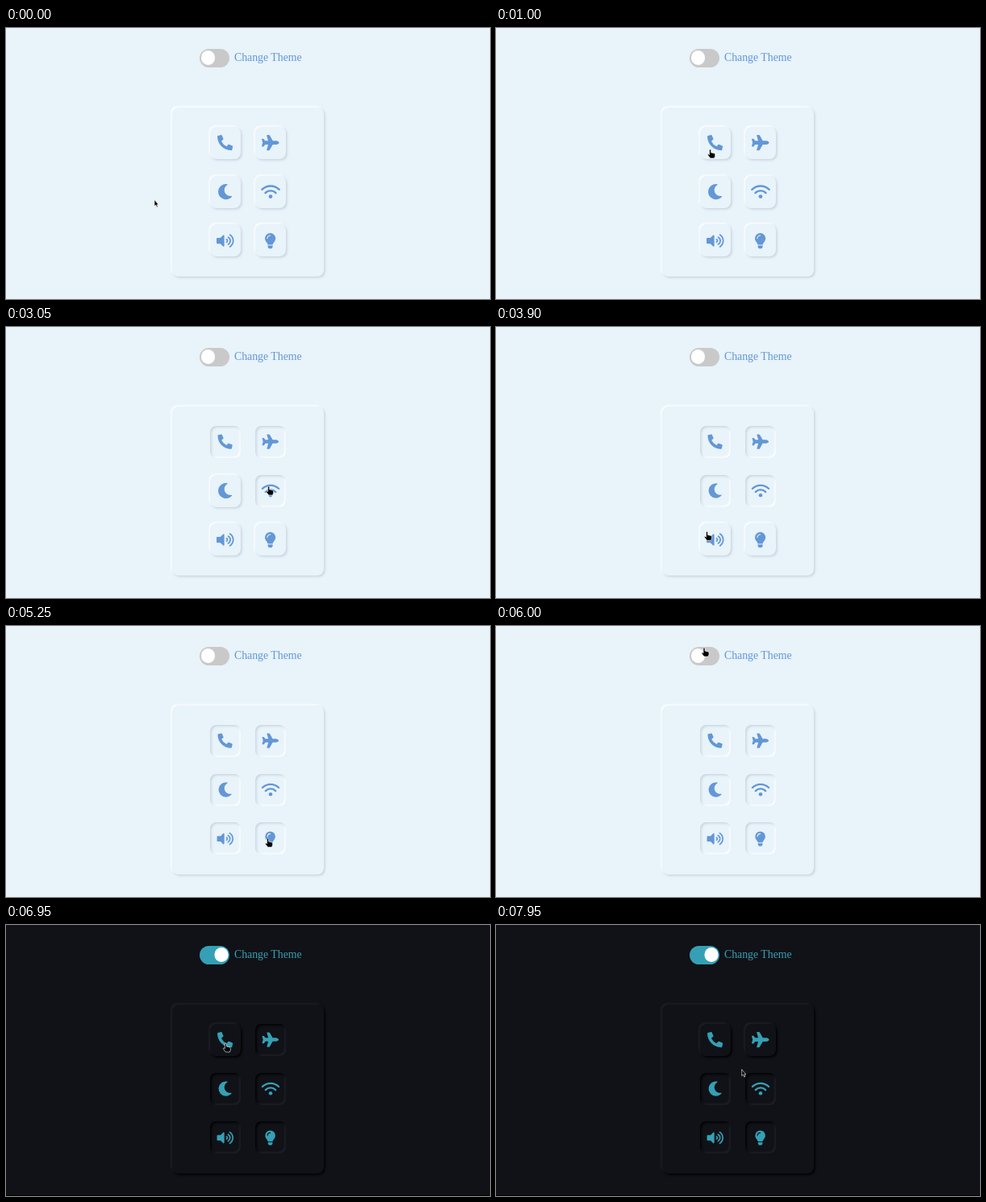
An HTML page that plays this animation: 600 px wide and 337 px high, repeating every 8 s.

```html
<!DOCTYPE html>
<html lang="en">
<head>
<meta charset="utf-8">
<title>Theme panel</title>
<style>
  html, body { margin: 0; width: 100%; height: 100%; overflow: hidden; }
  body {
    --bg: #e8f3fa; --ink: #6397d6; --shade: #c8d4dd; --glow: #fff;
    position: relative; background: var(--bg); color: var(--ink);
  }
  body.dark { --bg: #101217; --ink: #35a0b5; --shade: #000; --glow: #202329; }
  body.dark::after {
    content: ""; position: absolute; left: 0; right: 0; top: 336px; height: 1px; background: #000;
  }
  body > *, .key, #knob { position: absolute; box-sizing: border-box; }
  #label {
    left: 283px; top: 28px; font: 13.8px/18px "Liberation Serif", "Times New Roman", serif; white-space: nowrap;
  }
  #toggle { left: 239.5px; top: 25.5px; width: 37.5px; height: 23px; border-radius: 12px; }
  #knob { left: 2px; top: 2.9px; width: 17.2px; height: 17.2px; border-radius: 50%; background: #fff; }
  .raised { box-shadow: 1.5px 1.5px 3px var(--shade), -1.5px -1.5px 2.5px var(--glow); }
  .pressed { box-shadow: inset 1.5px 1.5px 3px var(--shade), inset -1.5px -1.5px 2.5px var(--glow); }
  #panel { left: 206px; top: 98.5px; width: 188px; height: 210px; border-radius: 8px; }
  .key { width: 38px; height: 40px; border-radius: 8px; display: grid; place-items: center; }
  .key svg { height: 19.2px; fill: var(--ink); overflow: visible; }
  .pressed svg { transform: scale(.95); }
  .line { fill: none; stroke: var(--ink); stroke-linecap: round; }
  #cursor { left: 0; top: 0; width: 20px; height: 20px; overflow: visible; stroke: #fff; stroke-width: .6; }
</style>
</head>
<body>
<div id="toggle"><div id="knob"></div></div>
<div id="label">Change Theme</div>
<div id="panel" class="raised"></div>
<svg id="cursor"><path id="pointer"/></svg>
<script>
const LOOP = 8000, SWITCH_AT = 6150;
const $ = id => document.getElementById(id);

// Each key: icon width on a 512-high grid, icon markup, times at which it flips.
const keys = [
  { w: 512, flips: [1300, 6900], icon: `<path d="M497 362l-112-48a24 24 0 0 0-28 7l-49 60A371 371 0 0 1 131 204l60-49a24 24 0 0 0 7-28l-48-112A24 24 0 0 0 123 1L19 25A24 24 0 0 0 0 48c0 256 208 464 464 464a24 24 0 0 0 23-19l24-104a24 24 0 0 0-14-27z"/>` },
  { w: 576, flips: [2250, 7700], icon: `<path d="M482 192c34 0 94 29 94 64s-60 64-94 64H366L265 496q-9 16-28 16h-56q-20 0-15-20l49-172H112l-43 58q-5 6-13 6H14q-16 0-13-18L32 256 1 146q-4-18 13-18h42q8 0 13 6l43 58h103L166 20q-5-20 15-20h56q19 0 28 16l101 176z"/>` },
  { w: 512, flips: [3750], icon: `<path d="M283 512c79 0 151-36 199-95 7-9-1-21-12-19-124 24-238-72-238-197 0-72 39-139 102-175 9-5 7-20-4-22A256 256 0 1 0 283 512z"/>` },
  { w: 640, flips: [3000], icon: `<path class="line" stroke-width="64" d="M36 184A401 401 0 0 1 604 184M146 298A242 242 0 0 1 494 298"/><circle cx="320" cy="416" r="64"/>` },
  { w: 576, flips: [4400], icon: `<path d="M215 71l-89 89H24q-24 0-24 24v144q0 24 24 24h102l89 89c15 15 41 4 41-17V88c0-21-26-32-41-17z"/><path class="line" stroke-width="48" d="M446 59A238 238 0 0 1 446 453M388 140A133 133 0 0 1 388 372M332 212A48 48 0 0 1 332 300"/>` },
  { w: 352, flips: [5250], icon: `<path d="M96 416h160v38q0 10-5 18l-17 26q-10 14-27 14h-62q-17 0-27-14l-17-26q-5-8-5-18zM0 176c0 44 16 85 44 116 16 19 42 58 52 92h160c10-34 36-73 52-92 28-31 44-72 44-116a176 176 0 0 0-352 0z"/><path class="line" style="stroke:var(--bg)" stroke-width="32" d="M80 176a96 96 0 0 1 96-96"/>` }
];

keys.forEach((key, i) => {
  key.x = 253 + i % 2 * 56;
  key.y = 123 + (i >> 1) * 60.7;
  key.el = document.createElement("div");
  key.el.style.cssText = `left:${key.x}px;top:${key.y}px`;
  key.el.innerHTML = `<svg viewBox="0 0 ${key.w} 512">${key.icon}</svg>`;
  document.body.insertBefore(key.el, $("cursor"));
});

// Cursor stops: time, x, y of the hot spot.
const stops = [
  [500, 184, 213.5], [1100, 272, 146], [1650, 272, 146], [2000, 322, 146],
  [2250, 322, 146], [2650, 327, 198], [3000, 327, 198], [3550, 269, 200],
  [3750, 269, 200], [3900, 261.5, 254.5], [4150, 268, 270], [4400, 268, 270],
  [5100, 324.5, 264], [5250, 324.5, 264], [6000, 258, 27], [6150, 258, 27],
  [6550, 271, 147], [6900, 271, 147], [7450, 326, 147], [7700, 326, 147],
  [7950, 304.7, 179.5]
];
const ARROW = "M0 0V8L1.8 6.6 3 9.4 4.3 8.8 3.1 6.2H5Z";
const HAND = "M0 0Q1 0 1 1V4L4.8 4.9Q6 5.2 6 6.4V8.5L5 11H0L-2.9 7.2C-3.5 6-2.2 5.5-1.4 6.4L-1 6.8V1Q-1 0 0 0Z";

const clamp = v => Math.min(1, Math.max(0, v));
const ease = v => v * v * (3 - 2 * v);
const mix = (a, b, p) => a + (b - a) * p;
const inside = (x, y, left, top, w, h) => x >= left && x <= left + w && y >= top && y <= top + h;

function cursorAt(t) {
  const next = stops.findIndex(s => s[0] > t);
  if (next === 0) return stops[0].slice(1);
  if (next < 0) return stops[stops.length - 1].slice(1);
  const [t0, x0, y0] = stops[next - 1], [t1, x1, y1] = stops[next];
  const p = ease((t - t0) / (t1 - t0));
  return [mix(x0, x1, p), mix(y0, y1, p)];
}

function draw(t) {
  document.body.classList.toggle("dark", t >= SWITCH_AT);
  const on = ease(clamp((t - SWITCH_AT) / 400));
  const channels = [[202, 53], [201, 160], [201, 181]].map(([a, b]) => Math.round(mix(a, b, on)));
  $("toggle").style.background = `rgb(${channels})`;
  $("knob").style.transform = `translateX(${16.5 * on}px)`;

  for (const key of keys) {
    const down = key.flips.filter(at => t >= at).length % 2;
    key.el.className = "key " + (down ? "pressed" : "raised");
  }

  const [x, y] = cursorAt(t);
  const hovering = inside(x, y, 239, 25, 38, 24) || keys.some(k => inside(x, y, k.x, k.y, 38, 40));
  $("pointer").setAttribute("d", hovering ? HAND : ARROW);
  $("cursor").style.transform = `translate(${x}px,${y}px)`;
}

function tick() {
  draw(performance.now() % LOOP);
  requestAnimationFrame(tick);
}
tick();
</script>
</body>
</html>
```
